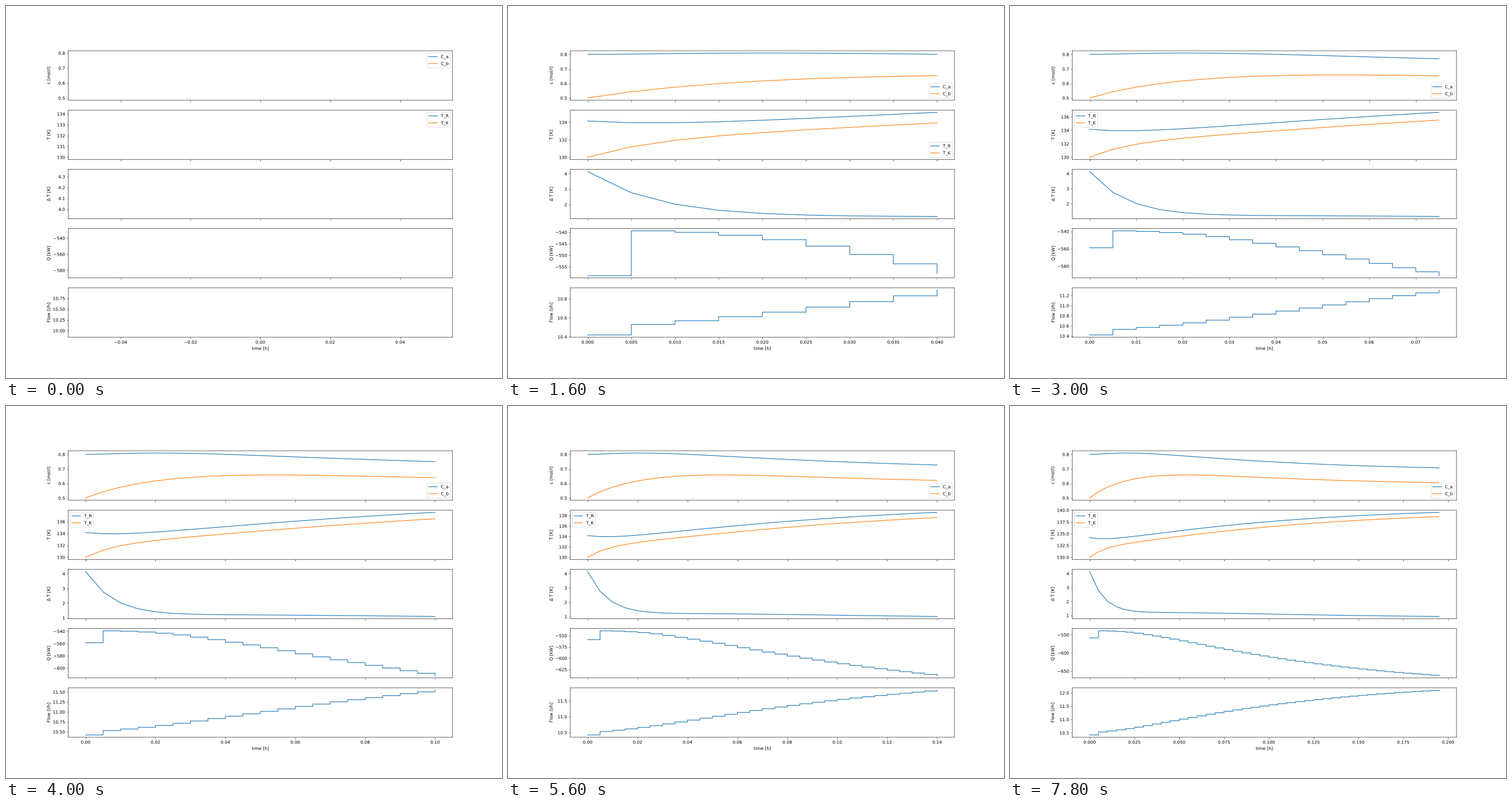
Animation of 864 by 648 pixels, one loop 8 s. Source, as a matplotlib script:

```python
import numpy as np
import matplotlib.pyplot as plt
from matplotlib import patheffects
from matplotlib.animation import FuncAnimation

FRAMES = 40
STEP_H = 0.005
SUBSTEPS = 20

# Draw lines and glyphs at exact sub-pixel positions
plt.rcParams.update({"path.snap": False, "text.hinting": "no_hinting",
                     "path.effects": [patheffects.Normal()]})


def control(first, *keys):
    """First input, then a smooth curve through (step, value) keys."""
    xs, ys = np.array(keys, float).T
    slope = np.gradient(ys, xs, edge_order=2)
    x = np.arange(1, FRAMES)
    i = np.clip(np.searchsorted(xs, x, side="right") - 1, 0, len(xs) - 2)
    h = xs[i + 1] - xs[i]
    s = (x - xs[i]) / h
    ease = s * s * (3 - 2 * s)
    y = (ys[i] + (ys[i + 1] - ys[i]) * ease
         + h * s * (1 - s) * (slope[i] * (1 - s) - slope[i + 1] * s))
    return np.append(first, y)


def reactor(x, flow, heat):
    """Time derivative of a cooled stirred tank reactor."""
    c_a, c_b, t_r, t_k = x
    temp = t_r + 273.15
    k_ab = 1.287e12 * np.exp(-9758.3 / temp)
    k_ad = 9.043e9 * np.exp(-8560.0 / temp)
    rho_cp = 0.9342 * 3.01
    transfer = 4032.0 * 0.215 * (t_r - t_k)
    reaction = (k_ab * c_a * 4.2 - k_ab * c_b * 11.0
                - k_ad * c_a ** 2 * 41.85)
    return np.array([
        flow * (5.1 - c_a) - k_ab * c_a - k_ad * c_a ** 2,
        -flow * c_b + k_ab * (c_a - c_b),
        -reaction / rho_cp + flow * (130.0 - t_r) - transfer / (rho_cp * 10.01),
        (heat + transfer) / 10.0,
    ])


def rk4(x, dt, *u):
    k1 = reactor(x, *u)
    k2 = reactor(x + dt / 2 * k1, *u)
    k3 = reactor(x + dt / 2 * k2, *u)
    k4 = reactor(x + dt * k3, *u)
    return x + dt / 6 * (k1 + 2 * k2 + 2 * k3 + k4)


def simulate(flow, heat):
    x = np.array([0.8, 0.5, 134.14, 130.0])
    states = [x]
    for u in zip(flow[:-1], heat[:-1]):
        for _ in range(SUBSTEPS):
            x = rk4(x, STEP_H / SUBSTEPS, *u)
        states.append(x)
    return np.array(states).T


time = np.arange(FRAMES) * STEP_H
heat = control(-558.9, (1, -539.4), (2, -540.05), (4, -543.25), (8, -557.9),
               (14, -586.5), (20, -612.5), (28, -639.1), (39, -662.9))
flow = control(10.419, (1, 10.53), (4, 10.659), (8, 10.891),
               (14, 11.252), (20, 11.547), (28, 11.842), (39, 12.1))
c_a, c_b, t_r, t_k = simulate(flow, heat)

fig, axes = plt.subplots(5, sharex=True, figsize=(16, 12), dpi=54)

# Quarter-pixel shift keeps the thin frames inside single pixels
dx, dy = 0.25 / 864, 0.25 / 648
fig.subplots_adjust(left=0.125 + dx, right=0.9 + dx,
                    bottom=0.11 - dy, top=0.88 - dy)
curves = []


def add(ax, data, label=None, style="default"):
    line, = ax.plot([], [], label=label, drawstyle=style)
    curves.append((line, data))


add(axes[0], c_a, "C_a")
add(axes[0], c_b, "C_b")
add(axes[1], t_r, "T_R")
add(axes[1], t_k, "T_K")
add(axes[2], t_r - t_k)
add(axes[3], heat, style="steps-post")
add(axes[4], flow, style="steps-post")

labels = ["c [mol/l]", "T [K]", "Δ T [K]", "Q [kW]", "Flow [l/h]"]
for ax, label in zip(axes, labels):
    ax.set_ylabel(label)
axes[4].set_xlabel("time [h]")
for ax in axes[:2]:
    ax.legend(loc="best", labelspacing=0.55)
fig.align_ylabels()


def draw(k):
    for line, data in curves:
        line.set_data(time[:k + 1], data[:k + 1])
    for ax in axes:
        ax.relim()
        ax.autoscale_view()
    return [line for line, _ in curves]


anim = FuncAnimation(fig, draw, frames=FRAMES, init_func=lambda: draw(0),
                     interval=200, repeat=True, repeat_delay=0, blit=False)
plt.show()
```
